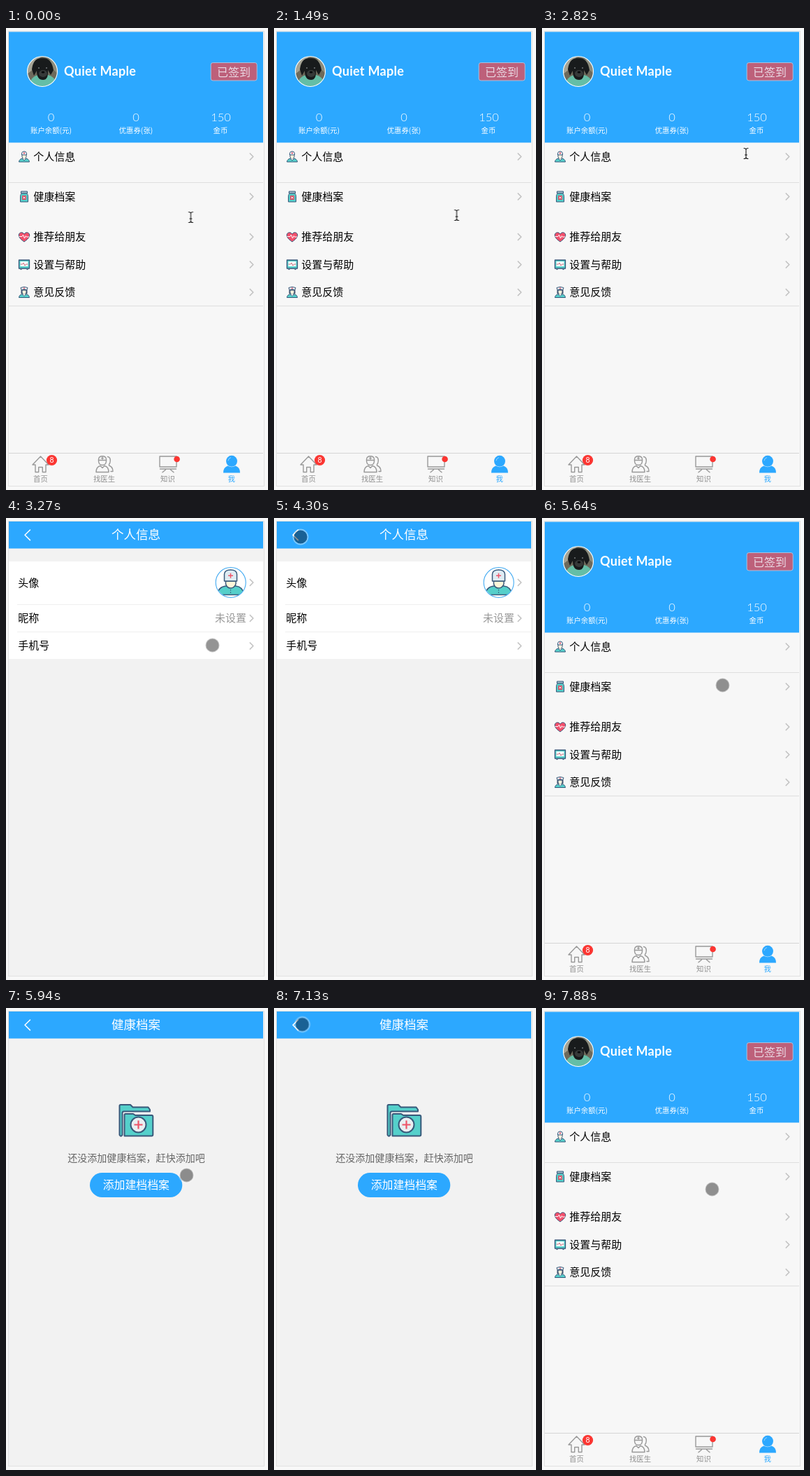
An HTML page for the animation above (8000 ms loop, 375 px wide and 659 px high).

```html
<!DOCTYPE html>
<html lang="zh-CN">
<head>
<meta charset="utf-8">
<title>个人中心</title>
<style>
  html, body { margin: 0; width: 100%; height: 100%; overflow: hidden; background: #f8f8f8; }
  svg { display: block; }
  text { font: 15px "Noto Sans CJK SC", "Noto Sans CJK JP", sans-serif; }
  .mid { text-anchor: middle; }
  .name { font: 700 18px Lato, sans-serif; letter-spacing: .3px; fill: #fff; }
  .num { font: 300 16.5px Lato, sans-serif; fill: #fff; }
  .small { font-size: 10.4px; }
  .title { font-size: 17.5px; fill: #fff; }
  .line { fill: none; stroke-linecap: round; stroke-linejoin: round; }
  .rule { stroke: #dedede; }
  .ink { stroke: #39597a; stroke-linejoin: round; }

  #home, #info, #record, #beam, #dot { animation: 8s step-end infinite; }
  #home { animation-name: home; }
  #info { animation-name: info; }
  #record { animation-name: record; }
  #beam { animation-name: beam; }
  #dot { animation-name: dot; }

  @keyframes home {
    0%, 61.25%, 92.875% { visibility: visible; }
    40.875%, 74.25% { visibility: hidden; }
  }
  @keyframes info {
    0%, 61.25% { visibility: hidden; }
    40.875% { visibility: visible; }
  }
  @keyframes record {
    0%, 92.875% { visibility: hidden; }
    74.25% { visibility: visible; }
  }
  @keyframes beam {
    0% { transform: translate(264.5px, 270px); visibility: visible; }
    18.625% { transform: translate(261.5px, 267px); }
    20.5% { transform: translate(248px, 244px); }
    22.375% { transform: translate(241px, 208px); }
    24.125% { transform: translate(270px, 177px); }
    26% { transform: translate(263.5px, 173px); }
    29.75% { transform: translate(276px, 174px); }
    31.625% { transform: translate(285.5px, 176px); }
    35.25% { transform: translate(292px, 179px); }
    37.125% { transform: translate(295.5px, 181px); visibility: visible; }
    40.875%, 100% { transform: translate(295.5px, 181px); visibility: hidden; }
  }
  @keyframes dot {
    0% { transform: translate(295.5px, 181.5px); visibility: hidden; }
    40.875% { transform: translate(295.5px, 181.5px); visibility: visible; }
    42.75% { transform: translate(312px, 182px); }
    46.5% { transform: translate(285px, 160px); }
    48.375% { transform: translate(190px, 100px); }
    50.125% { transform: translate(100px, 55px); }
    52% { transform: translate(55px, 33px); }
    53.75% { transform: translate(38px, 27px); }
    55.625% { transform: translate(34.5px, 25.5px); }
    65% { transform: translate(60px, 50px); }
    66.875% { transform: translate(150px, 150px); }
    68.625% { transform: translate(250px, 245px); }
    70.5% { transform: translate(258.5px, 238.5px); }
    76.125% { transform: translate(257.5px, 239px); }
    79.875% { transform: translate(245px, 222px); }
    81.75% { transform: translate(170px, 148px); }
    83.625% { transform: translate(85px, 66px); }
    85.375% { transform: translate(29.5px, 27px); }
    87.25% { transform: translate(36px, 24px); }
    89.125% { transform: translate(40.5px, 23.5px); }
    96.625% { transform: translate(58px, 40px); }
    98.5%, 100% { transform: translate(243.5px, 258.5px); visibility: visible; }
  }
</style>
</head>
<body>
<svg width="375" height="659" viewBox="0 0 375 659">
  <defs>
    <path id="chevron" class="line" d="M-2.5-4.5 2-0-2.5 4.5" stroke="#c3c3c3" stroke-width="1.7"/>
    <path id="back" class="line" d="M34.5 17 27 24.3 34.5 31.6" stroke="#fff" stroke-width="1.5"/>
    <clipPath id="face"><circle cx="52" cy="62" r="21.2"/></clipPath>
    <clipPath id="round"><circle cx="322" cy="92" r="21"/></clipPath>
    <g id="medic" class="ink" stroke-width="1">
      <path d="M-7.5 7.5C-7 3.5-4 2.5 0 2.5S7 3.5 7.5 7.5Z" fill="#55cfca"/>
      <path d="M-3-3V0Q-2.5 3.5 0 3.5T3 0V-3Z" fill="#fff3dc"/>
      <path d="M-2.5 3 0 5.5 2.5 3" fill="#fff"/>
    </g>
  </defs>

  <rect x="3.5" y="4.5" width="366" height="649" fill="#f7f7f7" stroke="#e1e1e1"/>

  <g id="home">
    <path d="M4 5.5H368V163.5H4Z" fill="#2ca8ff"/>
    <g clip-path="url(#face)">
      <path d="M30 40H75V85H30Z" fill="#6d6a5c"/>
      <path d="M30 40H50L40 58 30 66Z" fill="#a5a394"/>
      <path d="M61 40H75V66L66 58Z" fill="#8c8c7c"/>
      <ellipse cx="53" cy="80" rx="19" ry="14" fill="#64bea6"/>
      <path d="M37 59Q39 42 52 43 65 42 68 60L64 67 60 60Q61 74 53 74 44 74 44 61L40 68Z" fill="#181b1c"/>
      <ellipse cx="53" cy="65" rx="6" ry="5" fill="#363a39"/>
      <ellipse cx="53" cy="63" rx="2.4" ry="1.6" fill="#090b0c"/>
      <path d="M46 57h2M57 57h2" stroke="#71757a" stroke-width="1.5"/>
    </g>
    <circle cx="52" cy="62" r="21.5" fill="none" stroke="#fff" stroke-width="1.1"/>
    <text class="name" x="83" y="68">Quiet Maple</text>
    <rect x="293.2" y="49.5" width="66" height="25.5" rx="3" fill="#bd607a" stroke="#a9bfdf"/>
    <text class="mid" x="326" y="68.5" style="font-size:16px" fill="#ead9e3">已签到</text>
    <g class="mid">
      <text class="num" x="64.5" y="133">0</text>
      <text class="num" x="186" y="133">0</text>
      <text class="num" x="307.5" y="133">150</text>
      <g fill="#fff">
        <text class="small" x="64.5" y="150">账户余额(元)</text>
        <text class="small" x="186" y="150">优惠券(张)</text>
        <text class="small" x="307" y="150">金币</text>
      </g>
    </g>

    <path class="rule" d="M4 220.5H368M4 396.5H368"/>
    <text x="39.3" y="188.6">个人信息</text>
    <text x="39.3" y="245.6">健康档案</text>
    <text x="39.3" y="303">推荐给朋友</text>
    <text x="39.3" y="342.6">设置与帮助</text>
    <text x="39.3" y="382">意见反馈</text>
    <use href="#chevron" x="351.8" y="183.5"/>
    <use href="#chevron" x="351.8" y="240.5"/>
    <use href="#chevron" x="351.8" y="298"/>
    <use href="#chevron" x="351.8" y="337.5"/>
    <use href="#chevron" x="351.8" y="377"/>

    <g transform="translate(26 183.5)">
      <use href="#medic"/>
      <path class="ink" d="M-3.5-2.5V-5Q-3-7.5 0-7.5T3.5-5V-2.5Z" fill="#e3edf2"/>
      <path d="M-1.3-5h2.6M0-6.3v2.6" stroke="#ee5569"/>
    </g>
    <g class="ink" transform="translate(26 240.5)">
      <path d="M-4.5-7.5h9v3h-9Z" fill="#a6c2cf"/>
      <path d="M-3.5-4.5h7Q5.5-3 5.5-1V7.5h-11V-1Q-5.5-3-3.5-4.5Z" fill="#55cfca"/>
      <path d="M-3-1.5h6v6h-6Z" fill="#cf4c60" stroke="none"/>
      <path d="M-2 0 2 3M2 0-2 3" stroke="#fff" stroke-width=".8"/>
    </g>
    <g transform="translate(26 298)">
      <path class="ink" d="M0 7C-4 4-8 1-7.7-3-7-7-2-7.5 0-4 2-7.5 7-7 7.7-3 8 1 4 4 0 7Z" fill="#f2506c"/>
      <path class="line" d="M-7-.5h4l1.5-2.5 2 5 1.8-3.5 1 1.5H7" stroke="#fff"/>
    </g>
    <g transform="translate(26 337.5)">
      <path class="ink" d="M-7.5-6.5h15v12h-15Z" fill="#55cfca" stroke-width="1.3"/>
      <path d="M-5.5-4.5h11v7h-11Z" fill="#f4fafa"/>
      <path class="line" d="M-5-.5h2.5l1.5-2 2 4 1.5-2H5" stroke="#cf5e70" stroke-width=".9"/>
      <path class="ink" d="M-5.5 7h2M3.5 7h2"/>
    </g>
    <g transform="translate(26 377)">
      <path d="M-4.5 2V-3Q-4-6.5 0-6.5T4.5-3V2Z" fill="#49546c"/>
      <use href="#medic"/>
      <path class="ink" d="M-4-3.5-5-6.5Q0-9 5-6.5L4-3.5Q0-5-4-3.5Z" fill="#eef4f6"/>
      <path d="M-1-5.8h2M0-6.8v2" stroke="#ee5569" stroke-width=".9"/>
    </g>

    <path d="M4 606.5H368" stroke="#d5d5d5"/>
    <g class="line" stroke="#999" stroke-width="1.4">
      <path d="M42 623H38L49.5 611 61 623H57V633.5H52.3V626.5H46.7V633.5H42Z"/>
      <path d="M145.5 611.5Q149.5 612 149.3 617.5 149 621 147.5 622.5V624Q153 626 153 632.5H150"/>
      <path d="M132.5 615Q133 610.8 138 610.8T143.5 615V618Q143 623.5 138 623.5T132.5 618ZM132.5 616.5H143.5M138 612.3v2.6M136.7 613.6h2.6"/>
      <path d="M129 633.5Q129 626 135 624.5L138 627.5 141 624.5Q147 626 147 633.5Z"/>
      <path d="M220 611H244V626H220ZM220.5 629H243.5M228.5 630 224 633.8M235.5 630 240 633.8"/>
    </g>
    <g fill="#2ca8ff">
      <circle cx="323" cy="617.8" r="8"/>
      <path d="M311 634.5Q311 626.5 317.5 624.5 323 628 328.5 624.5 335 626.5 335 634.5Z"/>
    </g>
    <path class="line" d="M318 617Q318.5 613.5 321.5 612.8" stroke="#9bd5ff"/>
    <circle cx="65.5" cy="616.5" r="7.6" fill="#fb3632"/>
    <text class="mid" x="65.5" y="620.2" style="font:10.5px Lato,sans-serif" fill="#fff">8</text>
    <circle cx="244.6" cy="615" r="4.3" fill="#fb3632"/>
    <g class="mid" fill="#8f8f8f">
      <text class="small" x="49.5" y="647">首页</text>
      <text class="small" x="140.5" y="647">找医生</text>
      <text class="small" x="231.5" y="647">知识</text>
      <text class="small" x="322.7" y="647" fill="#2ca8ff">我</text>
    </g>
  </g>

  <g id="info">
    <path d="M4 5H369V653H4Z" fill="#f2f2f2"/>
    <path d="M4 5H368V43.5H4Z" fill="#2ca8ff"/>
    <use href="#back"/>
    <text class="title mid" x="186" y="30">个人信息</text>
    <path d="M4 62H368V201H4Z" fill="#fff"/>
    <path d="M16 123.5H368M16 162.5H368" stroke="#efefef"/>
    <text x="17.3" y="97.7">头像</text>
    <text x="17.3" y="147.7">昵称</text>
    <text x="17.3" y="187.2">手机号</text>
    <text x="299" y="147.7" fill="#999">未设置</text>
    <use href="#chevron" x="351.8" y="92"/>
    <use href="#chevron" x="351.8" y="143"/>
    <use href="#chevron" x="351.8" y="182.5"/>
    <g clip-path="url(#round)">
      <g class="ink" stroke-width="1.5">
        <path d="M302 109.5Q304 98 315 97H329Q339 98 341 109.5Z" fill="#55cfca"/>
        <path d="M314.5 90V94Q316 100 321.5 100T329 94V90Z" fill="#fff6d9"/>
        <path d="M312.5 90V80Q313 74 321.5 74T330.5 80V90Z" fill="#dfecf3"/>
      </g>
      <path d="M318 82.3h7M321.5 78.8v7" stroke="#ee5569" stroke-width="1.5"/>
      <path d="M321.5 102v1.5M321.5 105.5v1.5" stroke="#39597a" stroke-width="1.2"/>
    </g>
    <circle cx="321.7" cy="92" r="21.5" fill="none" stroke="#42aaf2" stroke-width="1.1"/>
  </g>

  <g id="record">
    <path d="M4 5H369V653H4Z" fill="#f2f2f2"/>
    <path d="M4 5H368V43.5H4Z" fill="#2ca8ff"/>
    <use href="#back"/>
    <text class="title mid" x="186" y="30">健康档案</text>
    <g class="ink" stroke-width="2" fill="#55d0cb">
      <path d="M162.5 181V139.5Q162.5 138 164 138H178L181.5 141.5H203.5L206 145V147.5H168.5Q166.5 147.5 166.5 150V181Q164.5 184.5 162.5 181Z"/>
      <path d="M169.5 152.5Q169.5 151 171 151H182L185 153H208.5Q210.3 153 210.3 155V180.5Q210.3 182.5 208.5 182.5H169.5Z"/>
      <circle cx="189.5" cy="166.5" r="11" fill="#e9eff2"/>
    </g>
    <path d="M183.5 166.5h12M189.5 160.5v12" stroke="#ee5569" stroke-width="2.2"/>
    <text class="mid" x="186.5" y="219.3" style="font-size:14.05px" fill="#666">还没添加健康档案，赶快添加吧</text>
    <rect x="120" y="235" width="132.3" height="35" rx="17.5" fill="#2ca8ff"/>
    <text class="mid" x="186.3" y="258.2" style="font-size:15.9px" fill="#fff">添加建档档案</text>
  </g>

  <path d="M3.5 4.5H369.5V653.5H3.5Z" fill="none" stroke="#e1e1e1"/>

  <g id="beam" class="line">
    <path d="M-3-7.5Q0-7.5 0-5.5 0-7.5 3-7.5M0-5.5V5.5M-3 7.5Q0 7.5 0 5.5 0 7.5 3 7.5M-1.5 2H1.5" stroke="#fff" stroke-width="2.4"/>
    <path d="M-3-7.5Q0-7.5 0-5.5 0-7.5 3-7.5M0-5.5V5.5M-3 7.5Q0 7.5 0 5.5 0 7.5 3 7.5M-1.5 2H1.5" stroke="#111" stroke-width="1.1"/>
  </g>
  <g id="dot">
    <circle r="9.7" fill="#000" fill-opacity=".42"/>
    <circle r="10.5" fill="none" stroke="#fff" stroke-opacity=".38" stroke-width="1.8"/>
  </g>
</svg>
</body>
</html>
```
